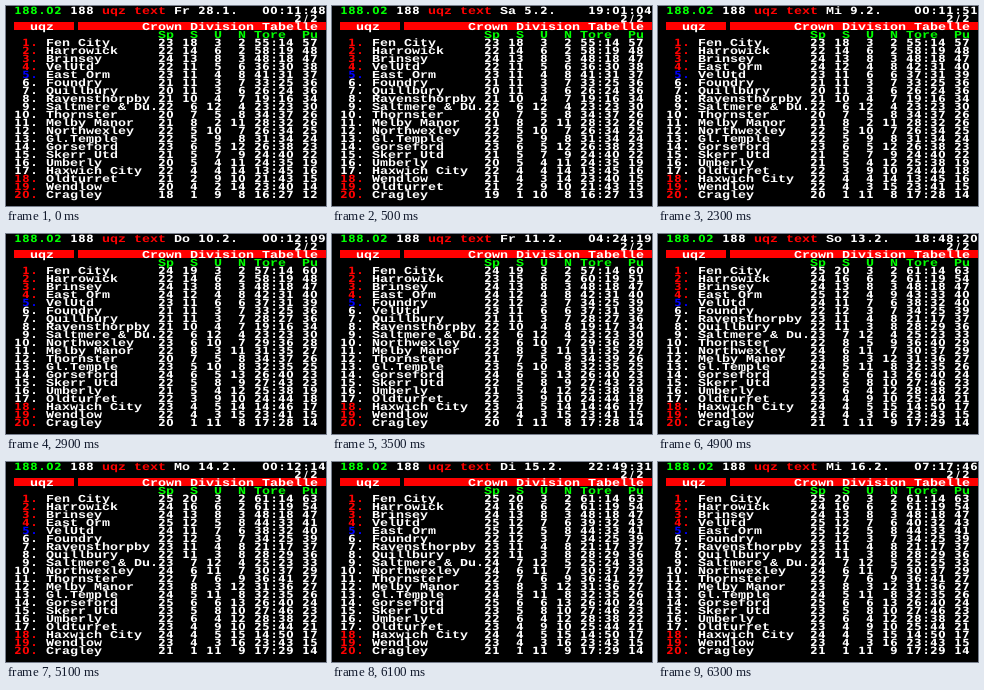
An HTML page for the animation above (8000 ms loop, 320x200 px).

```html
<!DOCTYPE html>
<html lang="de">
<head>
<meta charset="utf-8">
<title>Teletext Tabelle</title>
<style>
  html, body { margin: 0; width: 100%; height: 100%; overflow: hidden; background: #000; }
  svg { display: block; width: 320px; height: 200px; background: #000; }
  text { font-weight: bold; text-anchor: middle; text-rendering: geometricPrecision; }
  .word { font-family: "Liberation Mono", monospace; font-size: 13.33px; }
  .num { font-family: "DejaVu Sans", sans-serif; font-size: 10.5px; }
</style>
</head>
<body>
<svg id="stage" viewBox="0 0 320 200"></svg>
<script>
const LOOP = 8000, CELL = 8, BASE = 7.5;
const WHITE = '#fff', RED = '#f00', GREEN = '#0f0', BLUE = '#00f';
const stage = document.getElementById('stage');

// name | wins draws losses goals:against
const START = `Fen City|18 3 2 55:14
Harrowick|14 6 2 58:19
Brinsey|13 8 3 48:18
VelUtd|11 5 6 36:30
East Orm|11 4 8 41:31
Foundry|11 3 7 33:25
Quillbury|11 3 6 26:24
Ravensthorpby|10 4 7 19:16
Saltmere & Du.|6 12 4 23:23
Thornster|7 5 8 34:37
Melby Manor|8 2 11 28:32
Northwexley|5 10 7 26:34
Gl.Temple|5 9 8 31:34
Gorseford|6 5 12 26:38
Skerr Utd|5 7 9 24:40
Umberly|5 4 11 24:35
Haxwich City|4 4 14 13:45
Oldturret|2 9 10 21:43
Wendlow|4 2 14 23:40
Cragley|1 9 8 16:27`;

// "done" results stay in the table, "live" ones count for that step only
const STEPS = [
  { at: 0, day: 'Fr 28.1.', clock: '00:11:48' },
  { at: 500, day: 'Sa 5.2.', clock: '19:01:04', done: ['Cragley 0:0 Wendlow'] },
  { at: 2300, day: 'Mi 9.2.', clock: '00:11:51',
    done: ['Oldturret 3:1 Umberly', 'East Orm 1:0 Wendlow', 'Cragley 1:1 VelUtd'] },
  { at: 2900, day: 'Do 10.2.', clock: '00:12:09',
    done: ['Haxwich City 1:1 Gl.Temple', 'Fen City 2:0 Gorseford',
           'Quillbury 2:3 Northwexley', 'Melby Manor 3:3 Skerr Utd'] },
  { at: 3500, day: 'Fr 11.2.', clock: '04:24:19',
    done: ['Harrowick 2:0 Thornster', 'Ravensthorpby 0:1 Foundry'] },
  { at: 4300, day: 'Sa 12.2.', clock: '16:46:12',
    done: ['VelUtd 1:1 Northwexley', 'Gorseford 0:0 Gl.Temple'],
    live: ['Saltmere & Du. 1:0 Wendlow', 'Umberly 2:0 Skerr Utd'] },
  { at: 4500, day: 'So 13.2.', clock: '00:12:09',
    done: ['Saltmere & Du. 2:0 Wendlow', 'Umberly 3:0 Skerr Utd', 'Haxwich City 0:4 Fen City'] },
  { at: 4900, day: 'So 13.2.', clock: '18:48:20',
    done: ['Cragley 0:1 Harrowick', 'Oldturret 1:0 Melby Manor', 'Quillbury 0:2 Ravensthorpby'],
    live: ['Thornster 2:1 East Orm'] },
  { at: 5100, day: 'Mo 14.2.', clock: '00:12:14', done: ['Thornster 2:2 East Orm'] },
  { at: 6100, day: 'Di 15.2.', clock: '22:49:31', live: ['VelUtd 1:0 Saltmere & Du.'] },
  { at: 6300, day: 'Mi 16.2.', clock: '07:17:46', done: ['VelUtd 2:0 Saltmere & Du.'] }
];

function add(tag, attrs, parent) {
  const el = document.createElementNS('http://www.w3.org/2000/svg', tag);
  for (const key in attrs) el.setAttribute(key, attrs[key]);
  return parent.appendChild(el);
}

// One character per cell; digits and signs use a face with an open zero
function put(parent, col, row, str, fill = WHITE) {
  for (const run of str.matchAll(/[\d.:\/]+|[^\d.:\/ ]+/g)) {
    const isNum = /[\d.:\/]/.test(run[0]);
    const x = [...run[0]].map((_, i) => (col + run.index + i + 0.5) * CELL).join(' ');
    add('text', {
      class: isNum ? 'num' : 'word', x, y: 0, fill,
      transform: `matrix(1 0 0 ${isNum ? 0.95 : 0.8} 0 ${row * CELL + BASE})`
    }, parent).textContent = run[0];
  }
}

function putRight(parent, lastCol, row, value, fill) {
  const str = String(value);
  put(parent, lastCol - str.length + 1, row, str, fill);
}

function play(teams, result) {
  const [, home, a, b, away] = result.match(/^(.+) (\d+):(\d+) (.+)$/);
  const score = (name, own, other) => {
    const t = teams.find(team => team.name === name);
    t.gf += own;
    t.ga += other;
    if (own > other) t.w++;
    else if (own < other) t.l++;
    else t.d++;
  };
  score(home, +a, +b);
  score(away, +b, +a);
}

const points = t => 3 * t.w + t.d;
const rank = (a, b) => points(b) - points(a) || (b.gf - b.ga) - (a.gf - a.ga) || b.gf - a.gf;

function table(index) {
  const teams = START.split('\n').map(line => {
    const [name, stats] = line.split('|');
    const [w, d, l, gf, ga] = stats.split(/[ :]/).map(Number);
    return { name, w, d, l, gf, ga };
  });
  STEPS.slice(0, index + 1).forEach(s => (s.done || []).forEach(r => play(teams, r)));
  (STEPS[index].live || []).forEach(r => play(teams, r));
  return teams.sort(rank);
}

function drawFixed() {
  put(stage, 1, 0, '188.02', GREEN);
  put(stage, 8, 0, '188');
  put(stage, 12, 0, 'uqz text', RED);
  put(stage, 36, 1, '2/2');
  add('rect', { x: 8, y: 16, width: 60, height: 8, fill: RED }, stage);
  add('rect', { x: 72, y: 16, width: 248, height: 8, fill: RED }, stage);
  put(stage, 3, 2, 'uqz');
  put(stage, 17, 2, 'Crown Division Tabelle');
  [[19, 'Sp'], [23, 'S'], [26, 'U'], [29, 'N'], [31, 'Tore'], [37, 'Pu']]
    .forEach(([col, label]) => put(stage, col, 3, label, GREEN));
  for (let n = 1; n <= 20; n++) {
    putRight(stage, 3, n + 3, n + '.', n < 5 || n > 17 ? RED : n === 5 ? BLUE : WHITE);
  }
}

function drawStep(step, index) {
  const page = add('g', { visibility: 'hidden' }, stage);
  put(page, 21, 0, step.day);
  put(page, 32, 0, step.clock);
  table(index).forEach((t, i) => {
    const row = i + 4;
    put(page, 5, row, t.name);
    putRight(page, 20, row, t.w + t.d + t.l);
    putRight(page, 23, row, t.w);
    putRight(page, 26, row, t.d);
    putRight(page, 29, row, t.l);
    putRight(page, 35, row, t.gf + ':' + t.ga);
    putRight(page, 38, row, points(t));
  });
  return page;
}

drawFixed();
const pages = STEPS.map(drawStep);
const begin = performance.now();
let shown = -1;

function tick() {
  const time = (performance.now() - begin) % LOOP;
  const now = STEPS.filter(s => s.at <= time).length - 1;
  if (now !== shown) {
    pages.forEach((p, i) => p.setAttribute('visibility', i === now ? 'visible' : 'hidden'));
    shown = now;
  }
  requestAnimationFrame(tick);
}
tick();
</script>
</body>
</html>
```
